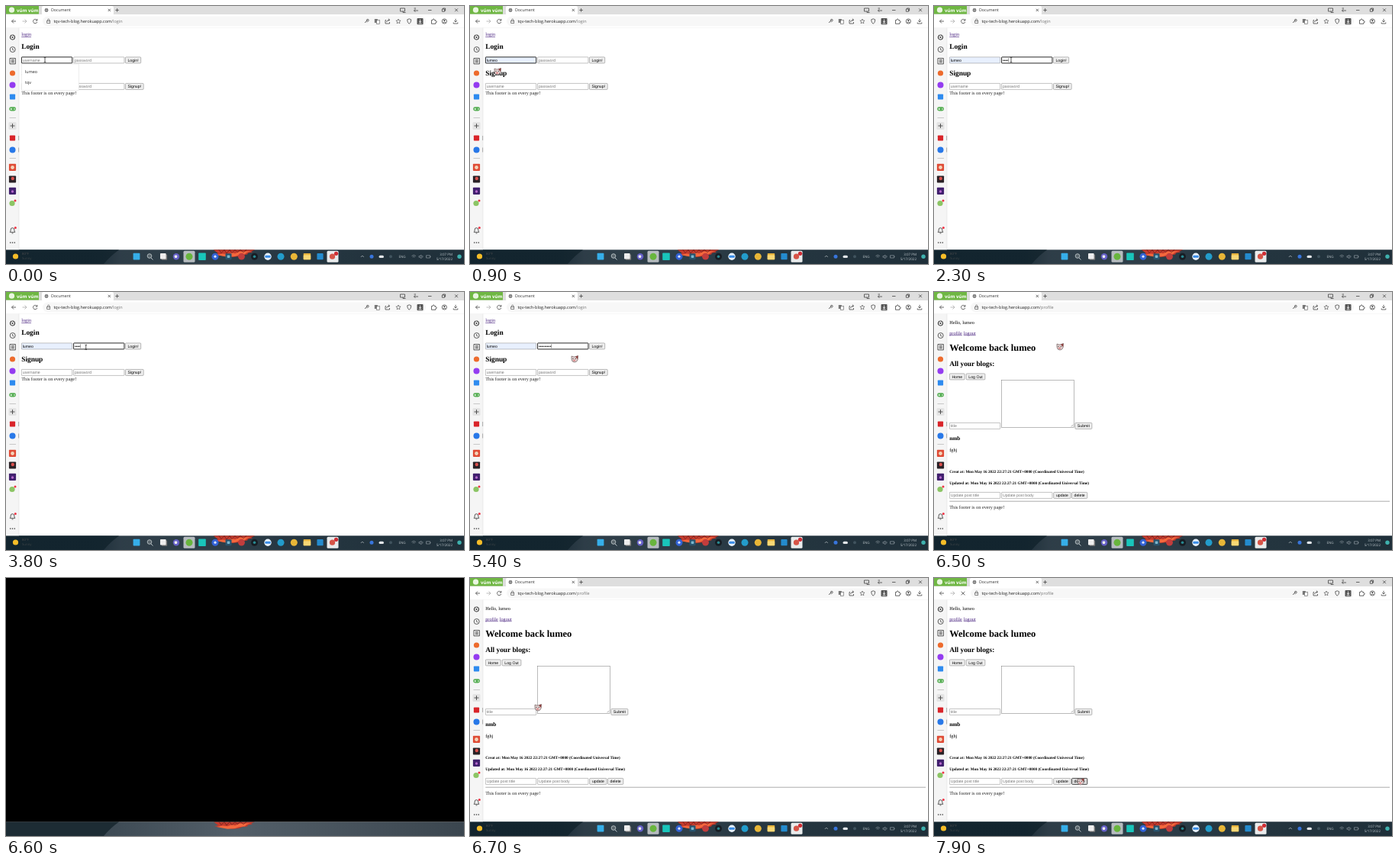
These frames come from a looping animation (600x338 px, 8000 ms). An HTML page:

```html
<!DOCTYPE html>
<html lang="en">
<head>
<meta charset="utf-8">
<title>Blog login</title>
<style>
  html, body { margin: 0; width: 100%; height: 100%; overflow: hidden; background: #fff; }
  svg { display: block; width: 100vw; height: 100vh; }
  text { text-rendering: geometricPrecision; white-space: pre; }
  .serif { font-family: "Liberation Serif", serif; }
  .sans { font-family: "Liberation Sans", sans-serif; }
  .ui { font-family: "Open Sans", sans-serif; }
  .bold { font-weight: bold; }
  .link { text-decoration: underline; text-decoration-thickness: .4px; }
</style>
</head>
<body>
<svg id="stage" viewBox="0 0 600 338"></svg>
<script>
const USER = "lumeo", SITE = "tqv-tech-blog.herokuapp.com";

// Markup helpers
const text = (x, y, size, str, cls = "serif", fill = "#000", extra = "") =>
  `<text x="${x}" y="${y}" font-size="${size}" class="${cls}" fill="${fill}" ${extra}>${str}</text>`;
const rect = (x, y, w, h, fill, extra = "") =>
  `<rect x="${x}" y="${y}" width="${w}" height="${h}" fill="${fill}" ${extra}/>`;
const circle = (x, y, r, fill, extra = "") =>
  `<circle cx="${x}" cy="${y}" r="${r}" fill="${fill}" ${extra}/>`;
const square = (x, y, r, fill) => rect(x - r, y - r, 2 * r, 2 * r, fill, 'rx=".8"');
const line = (d, color = "#444", width = .8) =>
  `<path d="${d}" fill="none" stroke="${color}" stroke-width="${width}"/>`;
const group = (id, body) => `<g id="${id}">${body}</g>`;

// Form controls, with the browser's default look
const INPUT_W = 66.3;
function input(x, y, { hint = "", value = "", focus = false, fill = "#fff" } = {}) {
  const edge = focus ? 'stroke="#111" stroke-width=".9"' : 'stroke="#858585" stroke-width=".5"';
  return rect(x + .4, y, INPUT_W, 8, fill, `${edge} rx=".5"`) +
    text(x + 1.7, y + 5.9, 5.2, value || hint, "sans", value ? "#000" : "#777");
}
function button(x, y, w, label, focus = false) {
  return rect(x + .2, y, w, 8, focus ? "#ddd" : "#efefef",
      `stroke="${focus ? "#222" : "#777"}" stroke-width="${focus ? .8 : .5}" rx="1"`) +
    text(x + .2 + w / 2, y + 5.9, 5.2, label, "sans", "#000", 'text-anchor="middle"');
}

function chrome() {
  const cross = (x, y, r) => line(`M${x - r} ${y - r}l${2 * r} ${2 * r}m0 ${-2 * r}l${-2 * r} ${2 * r}`);
  const tabs = rect(0, 0, 600, 11.5, "#dedede") +
    rect(0, 0, 43, 10.5, "#6fb743") + circle(7.5, 5.2, 3.6, "#e9f6df") +
    text(14, 7.6, 6.1, "vúm vúm", "ui bold", "#fff") +
    rect(47, 0, 94, 12, "#fff", 'rx="2"') +
    circle(53, 5.5, 2.4, "#666") + line("M50.6 5.5h4.8M53 3.1v4.8", "#ddd", .5) +
    text(59, 7.4, 5.3, "Document", "ui", "#333") + cross(135.3, 5.4, 1.6) +
    line("M143.3 5.4h4.6M145.6 3.1v4.6") +
    line("M516.5 3h6v4h-6zM520 7v1.5h3.5M534.5 3h2.5M540 6h-5.5m1.8-1.8l-1.8 1.8 1.8 1.8M553 5.5h4.5M571.3 4h3.2v3.2h-3.2zM572.4 4V3h3.2v3.2h-1") +
    cross(590, 5.3, 1.9);
  const bar = rect(0, 11, 600, 17.5, "#fff") +
    rect(48, 13.5, 502, 13, "#f7f7f7", 'rx="6.5"') +
    line("M13 20H7.5m2.5-2.5L7.5 20l2.5 2.5") + line("M21.5 20H27m-2.5-2.5L27 20l-2.5 2.5", "#aaa") +
    rect(53.7, 19.4, 4, 3, "none", 'stroke="#555" stroke-width=".7"') + line("M54.5 19.3v-1a1.2 1.2 0 0 1 2.4 0v1", "#555", .7) +
    line("M470 22l3.6-3.6m-2 2l1 1") + circle(473.8, 18.7, 1.4, "none", 'stroke="#444" stroke-width=".8"') +
    rect(482.8, 17, 4, 5, "#777") + rect(485.5, 18.5, 4, 5, "#fff", 'stroke="#555" stroke-width=".6"') +
    line("M498 18.5h-1v4.5h5.5V21M498.5 21q.5-2.8 4-2.8m-1.6-1.6l1.7 1.6-1.7 1.6") +
    line("M514 17l.9 2 2.2.2-1.7 1.5.5 2.1-1.9-1.1-1.9 1.1.5-2.1-1.7-1.5 2.2-.2z", "#444", .6) +
    line("M528.2 16.8l2.5 1q.1 4-2.5 5.5-2.6-1.5-2.5-5.5z") +
    rect(538.5, 16, 8, 8.2, "#555", 'rx="1"') + line("M542.5 17.5v4m-1.7-1.7l1.7 1.7 1.7-1.7M540.5 22.8h4", "#fff") +
    line("M557.5 18.5h1.5q0-1.6 1.1-1.6t1.1 1.6h1.6v1.3q1.5 0 1.5 1t-1.5 1v1.5h-5.3z") +
    circle(574.3, 20, 3.1, "none", 'stroke="#444" stroke-width=".8"') + circle(574.3, 19, 1.1, "#444") +
    line("M572.5 22q1.8-2 3.6 0") +
    line("M589 16.8v4.2m-1.8-1.8L589 21l1.8-1.8M586.2 21.5v1.5h5.6v-1.5") +
    line("M0 28.5H600", "#eee", .5);
  const dot = (x, y) => circle(x, y, 1.5, "#e34");
  const side = rect(0, 28.5, 17, 291, "#f5f5f5") + line("M17 28.5V319", "#d8d8d8", .5) +
    circle(8.5, 41, 3, "none", 'stroke="#333" stroke-width="1.2" stroke-dasharray="1.5 .3"') + circle(8.5, 41, 1, "#333") +
    circle(8.7, 57, 3.5, "none", 'stroke="#333" stroke-width=".8"') + line("M8.7 55v2.3l1.6.9", "#333") +
    line("M5 68.5h7.4v7.4H5zM6.8 70.6h4M6.8 72.2h4M6.8 73.8h4", "#333") +
    circle(8.5, 88, 3.6, "#ed6b2d") + circle(8.5, 103.5, 4, "#943cf0") + square(8.5, 119, 3.6, "#2e8bef") +
    rect(4.2, 132.3, 8.8, 5.2, "#54ad51", 'rx="2.4"') + line("M5.6 135h2.4m-1.2-1.2v2.4", "#fff") + circle(11, 135, .8, "#fff") +
    line("M4.5 146.5h8.5M4.5 199.5h8.5", "#bbb") + rect(3.5, 152, 10, 10, "#e4e4e4", 'rx="1.5"') +
    line("M5.5 157h6m-3-3v6", "#333") + square(8.5, 173, 3.6, "#d9252a") + circle(8.5, 188.5, 4, "#2878e8") +
    line("M16.6 170v6M16.6 185.5v6", "#aaa", 1) +
    square(8.5, 211.3, 4.6, "#df4b35") + circle(8.5, 211.5, 2.4, "#f3d2b8") +
    square(8.5, 227, 4.6, "#292126") + circle(8.8, 226, 2.2, "#d9514d") +
    square(8.5, 242.3, 4.6, "#41206e") + circle(8.5, 243, 1.7, "#b367cb") +
    circle(8, 258.5, 3.6, "#8cc565") + dot(12, 255) +
    line("M5.2 296.3h6.6q-1-1-1-3.2t-2.3-2.4-2.3 2.4-1 3.2zM7.6 297.8h1.8", "#333") + dot(12.3, 290.5) +
    [5.7, 8.5, 11.3].map(x => circle(x, 310, .8, "#333")).join("");
  return tabs + bar + side;
}

const BAR_TOP = 319.4;
const leaf = '<path d="M272 319.4H326l-5 2 2 1-6 1-1 2-6 .5-5 2-8 .8-8-1-8-.6-8-2 5-1z" fill="#c43a2c"/>' +
  '<path d="M276 326l8-1.5 6 .8 6-2 4 1 6-2.5 14-.5-5 2-2 2-8 1-5 1.8-10 .6z" fill="#f4683d"/>' +
  line("M279 319.5l3 4 4-4 3 4.5 4-4.5 3 4 4-4 3 3 4-3 4 3 4-3", "#5e1d1d", .7);
const wallpaper = rect(0, BAR_TOP, 600, 19, "url(#sky)") +
  `<path d="M0 ${BAR_TOP}H148Q136 328 128 338H0z" fill="#1d2c34"/>` + leaf;

function taskbar() {
  const y = 328.2, pane = (x, a) => rect(x - 7.5, 320.7, 15, 15, `rgba(255,255,255,${a})`, 'rx="1.5"');
  const small = (x, base, str, anchor = "end") =>
    text(x, base, 4.5, str, "ui", "#b9c3c8", `text-anchor="${anchor}"`);
  return rect(0, BAR_TOP, 600, 19, "url(#tint)") + leaf +
    circle(12.5, 328, 3.6, "#f6bd28") + text(21, 326.2, 4.3, "80°F", "ui", "#4c4b4d") + text(21, 332.2, 4.3, "Sunny", "ui", "#3f4548") +
    square(171, y, 4.4, "#36aee9") +
    circle(188, y - .7, 2.8, "#59656c", 'stroke="#bcc4c8" stroke-width=".9"') + line("M190 330l2.5 2.5", "#bcc4c8", 1) +
    square(207.5, y + 1, 3.6, "#777") + square(205.8, y - .5, 3.8, "#eee") +
    circle(223, y, 4.2, "#6560c7") + square(222.5, y, 1.7, "#eee") +
    pane(240, .65) + circle(240, y, 4.5, "#68b53d") + square(257, y, 4.8, "#19c6bb") +
    circle(274, y, 4.5, "#3262d5") + circle(274, y, 1.6, "#dce6ff") +
    square(291.5, y, 4, "#28536d") + square(291.5, y, 1.8, "#7ab7cd") +
    circle(308.5, y, 4.4, "#c13d3d") + circle(325.5, y, 4.5, "#171d24") + circle(325.5, y, 1.8, "#288991") +
    circle(343, y, 4.7, "#e6f1fc") + rect(339.3, y - 1.5, 7.4, 3, "#388ce7", 'rx="1"') +
    circle(360, y, 4.5, "#239ccb") + circle(377.3, y, 4.5, "#e8b637") +
    rect(389.7, 324.1, 9.5, 8.2, "#e8b43d", 'rx=".7"') + rect(389.7, 326.3, 9.5, 6, "#f8d875", 'rx=".7"') +
    square(411.5, y, 4.1, "#248bce") + pane(428, .9) + circle(427.5, y, 3.6, "#d65447") + circle(432.5, 324.3, 2.6, "#cf2c34") +
    line("M464.8 329l2-2 2 2", "#aab3b8") + circle(479, y, 2.5, "#3875dc") +
    rect(488.5, 326.8, 6.5, 3.3, "#e3e7eb", 'rx="1.7"') + circle(504, y, 2, "#40535e") +
    small(519, 330, "ENG", "middle") +
    line("M531.5 327.5q2.7-2.5 5.4 0M532.7 329q1.5-1.4 3 0M541 327.5h1.3l1.7-1.3v4.5l-1.7-1.4H541zM545.5 327q1 1.3 0 2.6M550.5 326.8h5v3.2h-5zM556.2 327.8v1.2", "#8d999f", .7) +
    small(585, 326.6, "3:07 PM") + small(585, 333, "5/17/2022") +
    circle(594, y, 2.7, "#3fb1ae");
}

const VISITED = "#4a2480";
const footer = y => text(20.2, y, 6.25, "This footer is on every page!", "serif", "#222");

const loginPage = text(20.2, 39, 6.25, "login", "serif link", VISITED) +
  text(20.2, 56.3, 9.375, "Login", "serif bold") +
  group("credentials", "") +
  text(20.2, 90.8, 9.375, "Signup", "serif bold") +
  input(20, 101.4, { hint: "username" }) + input(88.2, 101.4, { hint: "password" }) +
  button(156.2, 101.4, 23.8, "Signup!") + footer(115.7) +
  group("dropdown", rect(20.3, 76, 75, 34.5, "#fff", 'stroke="#ddd" stroke-width=".5"') +
    text(25, 88, 5.4, USER, "ui", "#222") + text(25, 102, 5.4, "tqv", "ui", "#222"));

const stamp = "Mon May 16 2022 22:27:21 GMT+0000 (Coordinated Universal Time)";
const profilePage = text(20.2, 42, 6.25, `Hello, ${USER}`) +
  text(20.2, 55.5, 6.25, "profile", "serif link", VISITED) + text(38.7, 55.5, 6.25, "logout", "serif link", VISITED) +
  text(20.2, 76.7, 12.5, `Welcome back ${USER}`, "serif bold") +
  text(20.2, 96.7, 9.375, "All your blogs:", "serif bold") +
  button(20.2, 106.9, 19.8, "Home") + button(42, 106.9, 24.7, "Log Out") +
  rect(88.3, 115.3, 95, 62, "#fff", 'stroke="#777" stroke-width=".5"') +
  line("M179.5 176.3l2.8-2.8m-1.2 2.8l1.2-1.2", "#777", .5) +
  input(20, 171.4, { hint: "title" }) + button(184.7, 171.4, 22, "Submit") +
  text(20.2, 193.7, 7.3, "nmb", "serif bold") + text(20.2, 209, 6.25, "fghj") +
  text(20.2, 237.4, 5.19, `Creat at: ${stamp}`, "serif bold") +
  text(20.2, 251.9, 5.19, `Updated at: ${stamp}`, "serif bold") +
  input(20, 262.4, { hint: "Update post title" }) + input(88.2, 262.4, { hint: "Update post body" }) +
  button(156.5, 262.4, 22.3, "update") + group("delete", "") +
  line("M20.3 274.2H597", "#888", .7) + footer(283.8);

const ibeam = line("M-1.3 -3.2Q0 -3.2 0 -2.4V2.4Q0 3.2 -1.3 3.2M1.3 -3.2Q0 -3.2 0 -2.4M0 2.4Q0 3.2 1.3 3.2", "#111", .7);
const pig = '<path d="M-4-4l3 1 2-.3L4.5-4.5 4.2.5Q3 4 0 4-3.6 4-4 0z" fill="#e3d2d1" stroke="#5a4749" stroke-width=".6"/>' +
  '<path d="M1-3.2L4.4-4.4 4 0z" fill="#8d3d3b"/>' +
  '<ellipse cx="-.4" cy="1.6" rx="1.7" ry="1.2" fill="#d98a8c"/>' +
  circle(-2, -.7, .6, "#222") + circle(1.3, -.7, .6, "#222");

document.getElementById("stage").innerHTML =
  '<defs><linearGradient id="sky"><stop offset=".2" stop-color="#3c4953"/><stop offset=".5" stop-color="#535f69"/><stop offset="1" stop-color="#3b464f"/></linearGradient>' +
  '<linearGradient id="tint" stop-color="#0c202b"><stop offset=".2" stop-color="#0c202b" stop-opacity=".6"/><stop offset=".25" stop-color="#0c202b" stop-opacity=".35"/><stop offset=".6" stop-color="#0c202b" stop-opacity=".6"/></linearGradient></defs>' +
  rect(0, 0, 600, 338, "#fff") + wallpaper +
  group("desktop", chrome() + group("address", "") + group("login", loginPage) +
    group("profile", profilePage) + taskbar() +
    `<g id="pointer">${group("ibeam", ibeam)}${group("pig", pig)}</g>`) +
  group("blackout", rect(0, 0, 600, BAR_TOP, "#000"));

const $ = id => document.getElementById(id);
const show = (id, on) => { $(id).style.display = on ? "" : "none"; };

// Timeline, in ms
const LOOP = 8000, PICK = 800, FOCUS = 1500, SUBMIT = 5700, LOADED = 6300, FLASH = 6600, DELETE = 7700;
const KEYSTROKES = [1900, 2000, 2200, 2300, 4500, 4700, 4800, 5000, 5200];
const PATH = [
  [200, 51, 70.5], [600, 36, 86], [900, 36, 86], [1500, 101, 70.5], [3700, 101, 70.5],
  [4200, 137, 88], [5400, 137, 88], [5700, 165, 72], [6500, 165, 72], [6700, 89, 170],
  [6900, 89, 170], [7400, 160, 283], [7700, 192, 267], [LOOP, 192, 267]
];

function pointerAt(t) {
  const i = PATH.findIndex(key => key[0] > t);
  if (i === 0) return PATH[0].slice(1);
  const [t0, x0, y0] = PATH[i - 1], [t1, x1, y1] = PATH[i];
  const u = (t - t0) / (t1 - t0), e = u * u * (3 - 2 * u);
  return [x0 + (x1 - x0) * e, y0 + (y1 - y0) * e];
}

function credentials(t) {
  const typed = KEYSTROKES.filter(k => k <= t).length;
  const typing = t >= FOCUS && t < SUBMIT, picked = t >= PICK;
  const caretX = 90.1 + typed * 1.83;
  return input(20, 66.9, { hint: "username", value: picked ? USER : "", focus: t < FOCUS, fill: picked ? "#e8f0fe" : "#fff" }) +
    input(88.2, 66.9, { hint: "password", value: "•".repeat(typed), focus: typing }) +
    (typing ? line(`M${caretX} 68.3v5.2`, "#000", .4) : "") +
    button(156.2, 66.9, 20.3, "Login!", t >= SUBMIT);
}

function address(t) {
  const loading = (t >= SUBMIT && t < LOADED) || t >= DELETE;
  const icon = loading ? "M35.8 17.8l4.6 4.6m0-4.6l-4.6 4.6" : "M40.5 18.6a2.7 2.7 0 1 0 .3 2.3M40.9 16.9v2.2h-2.2";
  return line(icon) + text(62.4, 22.1, 5.5,
    `${SITE}<tspan fill="#777">/${t < LOADED ? "login" : "profile"}</tspan>`, "ui", "#222");
}

function render(t) {
  const black = t === FLASH, [x, y] = pointerAt(t);
  const overField = t < SUBMIT && x < 155 && y > 66 && y < 75;
  show("desktop", !black);
  show("blackout", black);
  show("login", t < LOADED);
  show("profile", t >= LOADED);
  show("dropdown", t < PICK);
  show("ibeam", overField);
  show("pig", !overField);
  $("pointer").setAttribute("transform", `translate(${x} ${y})`);
  $("credentials").innerHTML = credentials(t);
  $("delete").innerHTML = button(180.3, 262.4, 20.3, "delete", t >= DELETE);
  $("address").innerHTML = address(t);
}

const start = performance.now();
function tick() {
  const elapsed = (performance.now() - start) % LOOP;
  render(Math.floor(elapsed / 100) * 100);
  requestAnimationFrame(tick);
}
tick();
</script>
</body>
</html>
```
